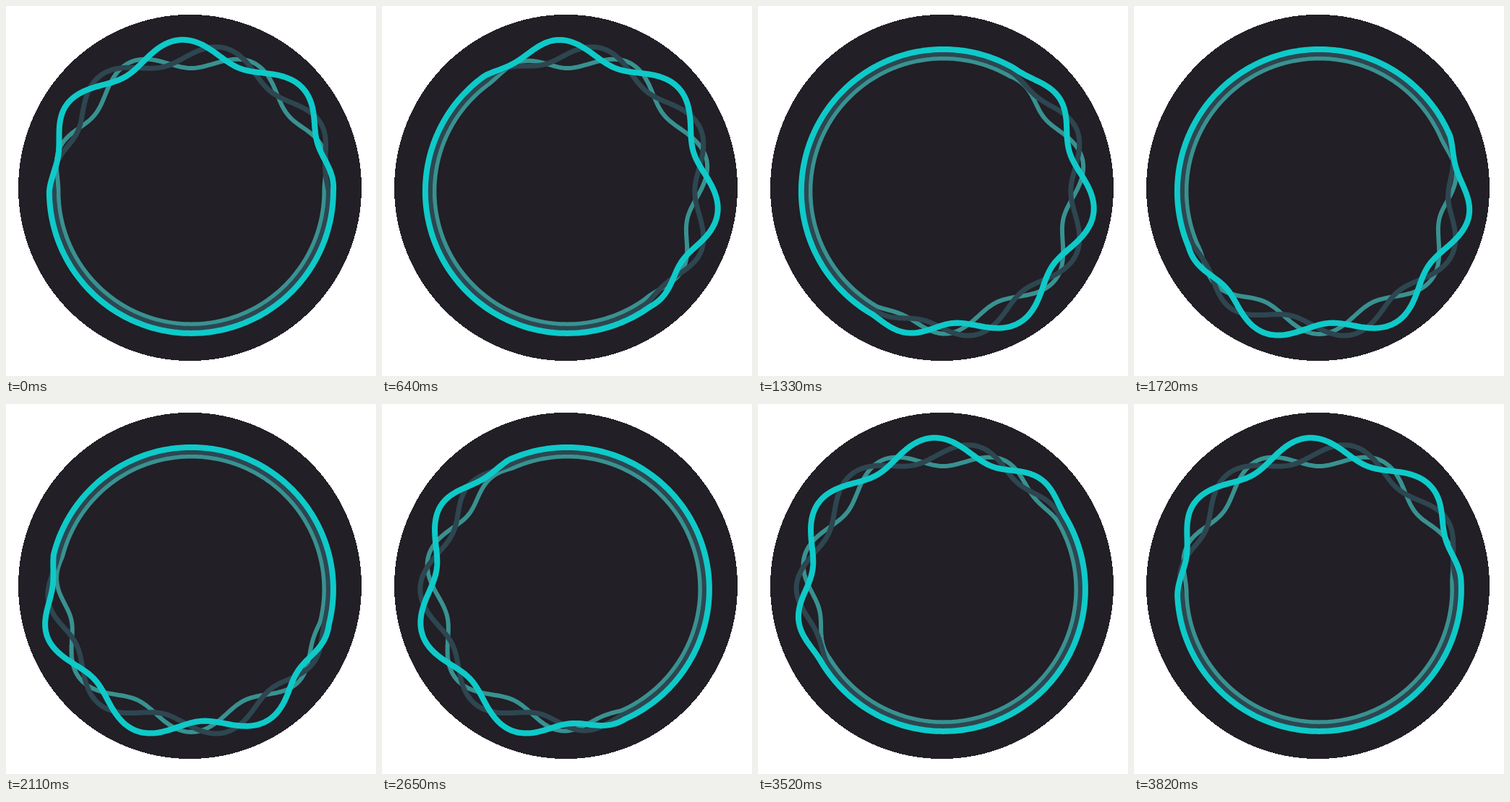
An HTML page that plays this animation: 512 px wide and 512 px high, repeating every 3850 ms.

```html
<!DOCTYPE html>
<html lang="en">
<head>
<meta charset="utf-8">
<title>Wave ring</title>
<style>
  html, body { margin: 0; width: 100%; height: 100%; overflow: hidden; background: #fff; }
  svg { display: block; width: 100vw; height: 100vh; }
  .disc { fill: #221f26; shape-rendering: crispEdges; }
  path { fill: none; stroke-linejoin: round; }
</style>
</head>
<body>
<svg viewBox="0 0 512 512">
  <ellipse class="disc" cx="254.5" cy="251.5" rx="237.5" ry="239.6"/>
  <g id="rings"></g>
</svg>
<script>
  const LOOP = 3850, HOLD = 100, STEP = 30, STEPS = 126;
  const CENTER = 256.4, AMPLITUDE = 13.6, WAVES = 7;
  const HALF_SPAN = 90, RAMP = 36;
  const RAD = Math.PI / 180;

  // Angles are in degrees, clockwise from the top; phase is within one wave.
  const rings = [
    { radius: 184, width: 6, phase: 180, color: '#389291' },
    { radius: 190, width: 7, phase: 90, color: '#2d4650' },
    { radius: 196.5, width: 8, phase: -30, color: '#0ecac9' }
  ];

  const group = document.getElementById('rings');
  for (const ring of rings) {
    ring.path = document.createElementNS('http://www.w3.org/2000/svg', 'path');
    ring.path.setAttribute('stroke', ring.color);
    ring.path.setAttribute('stroke-width', ring.width);
    group.append(ring.path);
  }

  // Strength of the wave at an angle: full in the middle, fading at both ends.
  function envelope(angle, middle) {
    const turn = (((angle - middle) % 360) + 540) % 360 - 180;
    const inset = Math.min(Math.max(HALF_SPAN - Math.abs(turn), 0), RAMP);
    return Math.sin(inset / RAMP * Math.PI / 2);
  }

  function outline({ radius, phase }, middle) {
    const points = [];
    for (let a = 0; a < 360; a++) {
      const wave = Math.cos((WAVES * a - phase) * RAD);
      const r = radius + AMPLITUDE * wave * envelope(a, middle);
      const x = CENTER + r * Math.sin(a * RAD);
      const y = CENTER - r * Math.cos(a * RAD);
      points.push(x.toFixed(2) + ' ' + y.toFixed(2));
    }
    return 'M' + points.join('L') + 'Z';
  }

  function draw(now) {
    const time = now % LOOP;
    const step = time < HOLD ? 0 : 1 + Math.floor((time - HOLD) / STEP);
    const middle = step / STEPS * 360;
    for (const ring of rings) ring.path.setAttribute('d', outline(ring, middle));
  }

  const start = performance.now();
  function tick() {
    draw(performance.now() - start);
    requestAnimationFrame(tick);
  }
  tick();
</script>
</body>
</html>
```
